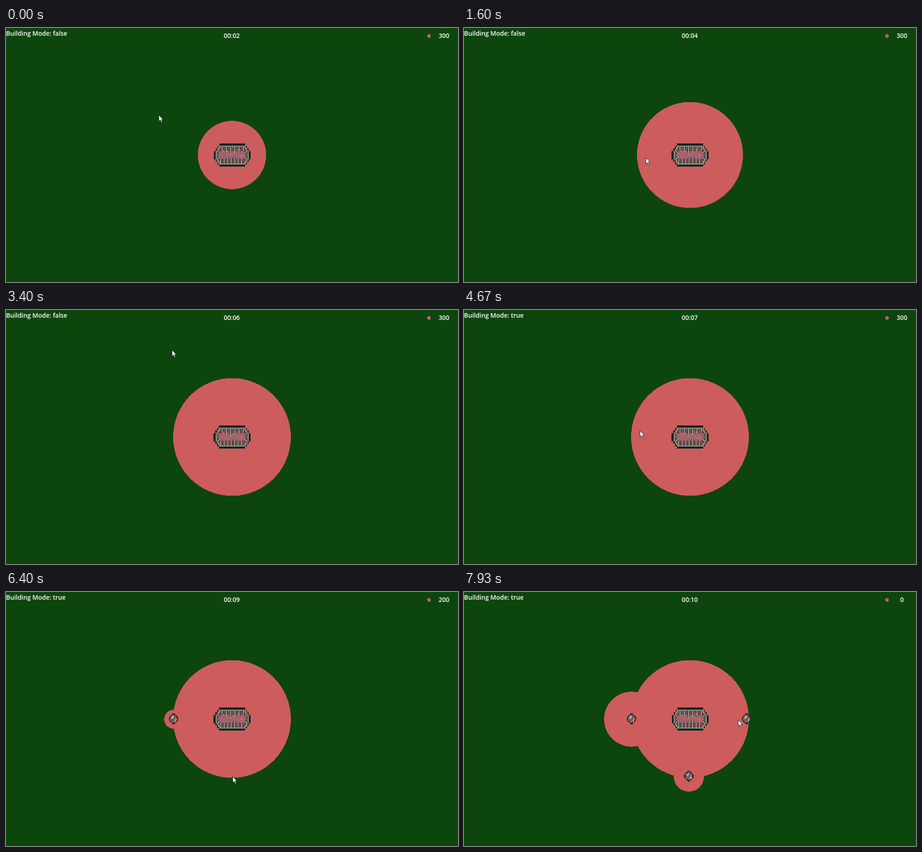
An HTML page that plays this animation: 998x561 px, repeating every 8 s.

```html
<!DOCTYPE html>
<html lang="en">
<head>
<meta charset="utf-8">
<title>Building mode</title>
<style>
html, body { margin: 0; width: 100%; height: 100%; overflow: hidden; background: #0d460d; }
svg { display: block; width: 998px; height: 561px; }
text { font: 600 13.87px "Open Sans", "Noto Sans", sans-serif; fill: #fff; }
.mid { text-anchor: middle; }
.land { fill: #cd5c5c; }
.crisp { shape-rendering: crispEdges; }
</style>
</head>
<body>
<svg viewBox="0 0 998 561">
  <g id="lands" class="land crisp"></g>
  <g id="base"></g>
  <g id="seeds" class="crisp"></g>
  <g id="coin" class="crisp"></g>
  <text id="mode" x="0" y="16.5"></text>
  <text id="clock" class="mid" x="498.5" y="22"></text>
  <text id="money" class="mid" x="967" y="22"></text>
  <path id="cursor" d="M.6.6V14L3.7 11.2 6 16.6 8.3 15.6 6 10.3H10Z" fill="#fff" stroke="#142014"/>
</svg>
<script>
const LOOP = 8000, FPS = 15, GROWTH = 26, LIMIT = 130;
const BLACK = '#1b2022', MINT = '#9fd9b2', ROSE = '#a9616c';
const $ = id => document.getElementById(id);

// Circles of land: centre, time of birth in seconds, first radius
const lands = [
  { x: 499, y: 280.5, born: 0, r: 75.4 },
  { x: 370, y: 281, born: 5.6, r: 0 },
  { x: 496.5, y: 407.5, born: 6.65, r: 0 },
  { x: 624, y: 281, born: 7.83, r: 0 }
];

// Cursor stops: ms, x, y
const stops = [
  [0, 337, 192], [1000, 401, 308], [1600, 401, 286], [2670, 394, 295], [3400, 366, 88],
  [3730, 398, 40], [4400, 398, 40], [4670, 388, 267], [4930, 386, 298], [5600, 370, 281],
  [6400, 500, 407], [6700, 497, 408], [7830, 624, 281], [7930, 605, 282]
];

function add(parent, tag, attrs = {}) {
  const el = document.createElementNS('http://www.w3.org/2000/svg', tag);
  for (const k in attrs) el.setAttribute(k, attrs[k]);
  return parent.appendChild(el);
}

function random(seed) {
  return () => (seed = seed * 16807 % 2147483647) / 2147483647;
}

// Mottled seed of 8 by 9 cells with a dark rim
function drawNut(parent, x, y, w, h, tones) {
  const g = add(parent, 'g'), rnd = random(77);
  for (let j = 0; j < 9; j++) {
    for (let i = 0; i < 8; i++) {
      const d = Math.abs(i - 3.5) + Math.abs(j - 4);
      if (d > 5) continue;
      const rim = d > 4 || i === 0 || i === 7 || j === 0 || j === 8;
      const fill = rim ? BLACK : tones[Math.floor(rnd() * tones.length)];
      add(g, 'rect', { x: x + i * w, y: y + j * h, width: w, height: h, fill });
    }
  }
  return g;
}

// Box whose corners are cut in three steps
function stairs(l, t, r, b, dx, dy) {
  const pts = [];
  const corner = (x, y, sx, sy, order) => order.forEach(k => {
    const outer = [x + sx * dx * k, y + sy * dy * (3 - k)];
    const inner = [x + sx * dx * k, y + sy * dy * (4 - k)];
    pts.push(...(order[0] ? [outer, k ? inner : outer] : [k ? inner : outer, outer]));
  });
  corner(l, t, 1, 1, [0, 1, 2, 3]);
  corner(r, t, -1, 1, [3, 2, 1, 0]);
  corner(r, b, -1, -1, [0, 1, 2, 3]);
  corner(l, b, 1, -1, [3, 2, 1, 0]);
  return 'M' + pts.join('L') + 'Z';
}

function drawBase(left, reach) {
  const g = add($('base'), 'g'), rnd = random(5);
  add(g, 'path', { d: stairs(left, 255, 540, 306, 4, 5.5), fill: BLACK, class: 'crisp' });
  add(g, 'path', { d: stairs(464, 261, 535, 300.5, 2.4, 3.7), fill: '#84444c', stroke: MINT, 'stroke-width': 1.4 });
  add(g, 'path', { d: 'M474 272H525L530 281 525 289H474L468 281Z', fill: ROSE });
  let prongs = 'M466 270l6 6M466 291l8 -7M533 270l-6 6M533 291l-7 -6';
  for (let i = 0; i < 6; i++) prongs += `M${477 + i * 9.4} 261v${reach + rnd() * 7}`;
  for (let i = 0; i < 7; i++) prongs += `M${474 + i * 7.7} 300v${-reach - rnd() * 8}`;
  add(g, 'path', { d: prongs, fill: 'none', stroke: '#41292d', 'stroke-width': 4.4 });
  add(g, 'path', { d: prongs, fill: 'none', stroke: MINT, 'stroke-width': 1.7 });
  for (let i = 0; i < 6; i++) {
    add(g, 'rect', { x: 479 + i * 8, y: 268 + rnd() * 14, width: 2.5, height: 2, fill: '#d99a83' });
  }
  return g;
}

const wide = drawBase(458, 9), slim = drawBase(459, 10);
drawNut($('coin'), 928.5, 11.5, 1.4, 1.3, [ROSE, '#c08a90', '#8a5a62']);
for (const p of lands) p.el = add($('lands'), 'circle', { cx: p.x, cy: p.y });
const seeds = lands.slice(1);
for (const p of seeds) {
  p.nut = drawNut($('seeds'), p.x - 10.5, p.y - 13, 2.6, 2.67, ['#6f6064', '#a5cdb0', ROSE, '#7d5058']);
}

const show = (el, on) => el.style.display = on ? '' : 'none';

function tipAt(ms) {
  const i = stops.findIndex(s => s[0] > ms);
  if (i < 0) return stops[stops.length - 1].slice(1);
  const [t0, x0, y0] = stops[i - 1], [t1, x1, y1] = stops[i];
  const k = (ms - t0) / (t1 - t0);
  const ease = (k + k * k * (3 - 2 * k)) / 2;
  return [x0 + (x1 - x0) * ease, y0 + (y1 - y0) * ease].map(Math.round);
}

function draw(ms) {
  const step = Math.floor(ms * FPS / 1000 + 0.1);
  const sec = step / FPS;
  for (const p of lands) {
    const age = sec - p.born;
    p.el.setAttribute('r', age < 0 ? 0 : Math.min(LIMIT, p.r + age * GROWTH));
  }
  for (const p of seeds) show(p.nut, sec >= p.born);
  const swell = step % 9 === 6 || step % 9 === 7;
  show(wide, swell);
  show(slim, !swell);
  $('mode').textContent = 'Building Mode: ' + (sec >= 4.5);
  $('clock').textContent = '00:' + String(2 + Math.floor(sec + 0.9)).padStart(2, '0');
  $('money').textContent = 300 - 100 * seeds.filter(p => sec >= p.born).length;
  $('cursor').setAttribute('transform', `translate(${tipAt(sec * 1000)})`);
}

const start = performance.now();
function tick() {
  draw((performance.now() - start) % LOOP);
  requestAnimationFrame(tick);
}
draw(0);
requestAnimationFrame(tick);
</script>
</body>
</html>
```
